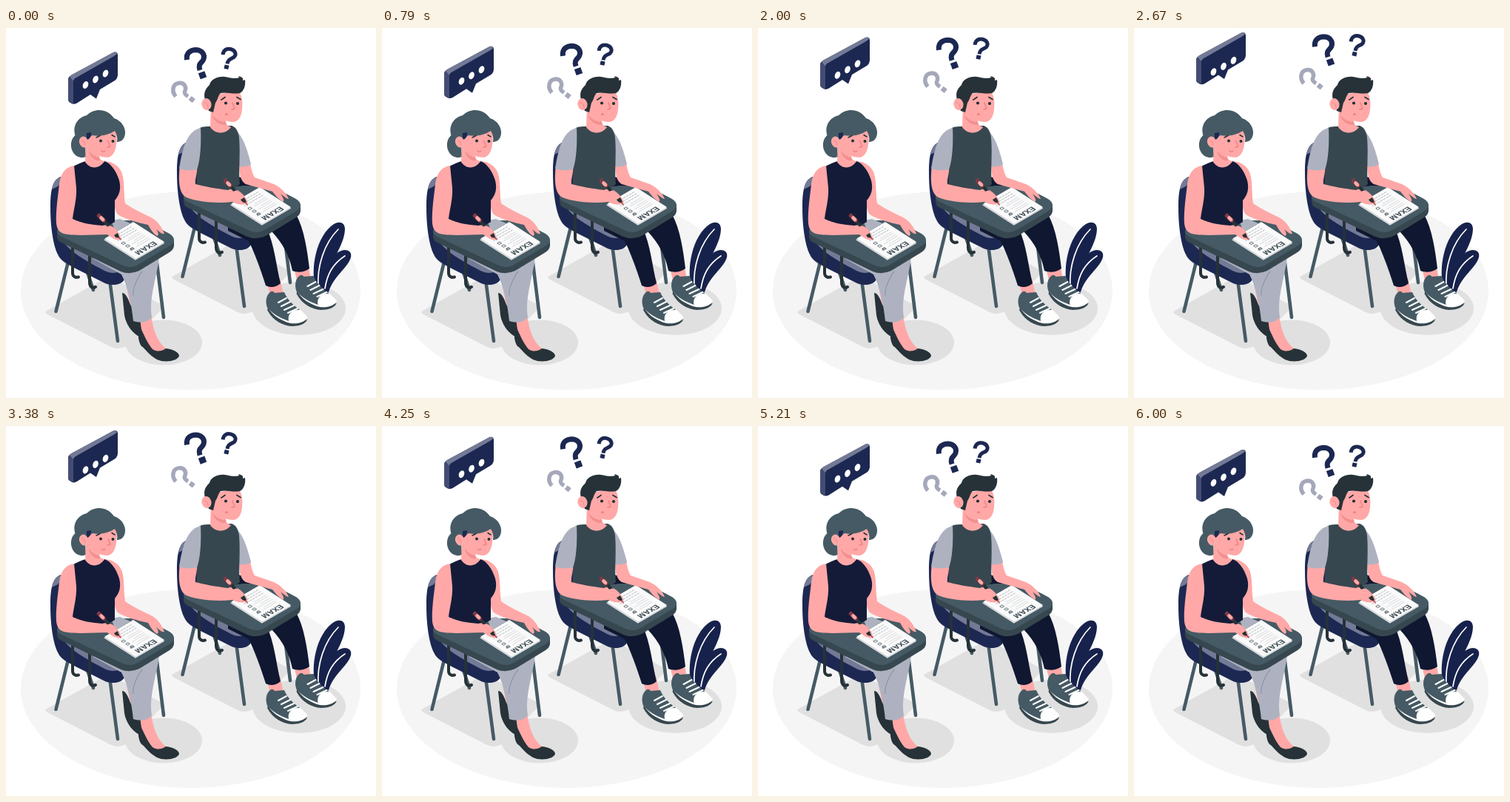
Animation of 500 by 500 pixels, one loop 6.04 s. Source, as an HTML page:

```html
<!DOCTYPE html>
<html lang="en">
<head>
<meta charset="utf-8">
<title>Exam</title>
<style>
  html, body { margin: 0; width: 100%; height: 100%; overflow: hidden; background: #fff; }
  svg { display: block; width: 100vw; height: 100vh; }
  .line { fill: none; stroke-linecap: round; stroke-linejoin: round; }
  .navy { fill: #1c2852; }
  .ink { fill: #141b38; }
  .denim { fill: #0f1731; }
  .mist { fill: #737a96; }
  .lilac { fill: #aeb2c0; }
  .skin { fill: #ffa8a7; }
  .blush { fill: #f28f8f; }
  .teal { fill: #455a64; }
  .slate { fill: #37474f; }
  .coal { fill: #263238; }
  .white { fill: #fff; }
  .exam { font: bold 10.5px "Liberation Sans", Arial, sans-serif; fill: #37474f; }
</style>
</head>
<body>
<svg viewBox="0 0 500 500" xmlns="http://www.w3.org/2000/svg">
  <defs>
    <g id="chair">
      <g class="line" stroke="#455a64" stroke-width="4.6">
        <path d="M84 316L67.500 383M140 340L151 423M203 310L213 391M110 330L118 354"/>
      </g>
      <path class="navy" d="M74 201C63 205 60 219 60 242C60 270 64 294 70 306C74 315 83 319 94 325L134 345C145 349 156 347 160 340L160 318L98 278L92 200Z"/>
      <path class="mist" d="M75 201C67 203 63 210 62 218L70 214L78 204Z"/>
      <path class="mist" d="M74 282C80 300 112 317 133 328C143 333 153 331 157 326L153 312L94 280Z"/>
    </g>
    <g id="desk">
      <g class="line" stroke="#263238" stroke-width="4">
        <path d="M90 292V331Q90 336 95 337L98 336.500M113 302V344Q113 350 118 351L121 350"/>
      </g>
      <path class="slate" d="M69 274V282Q69 287 75 290L155 329Q167 334 180 328L221 303Q227 299 227 294V286L150 270Z"/>
      <path class="teal" d="M70 272C72 267 80 266 90 267L150 260L173 260C190 262 206 270 221 278C229 283 229 290 222 294L180 319C172 324 164 324 156 320L75 282C69 279 68 275 70 272Z"/>
      <g transform="matrix(-.86 .5 -.84 -.54 214 289)">
        <rect x="1.500" y="-2" width="46" height="51" fill="#d5d7db"/>
        <rect width="45" height="50" fill="#fafafa"/>
        <text class="exam" x="8" y="9.500">EXAM</text>
        <g class="line" stroke="#cdd0d5" stroke-width=".7">
          <path d="M8 15H29M8 18H25M8 22H29M8 25H23M8 29H29M8 32H26"/>
        </g>
        <g class="line" stroke="#9ca1aa" stroke-width=".7" stroke-dasharray="2.500 2">
          <path d="M8 37H37M8 41H34M8 45H37"/>
        </g>
        <g class="line" stroke="#37474f" stroke-width=".7">
          <path d="M34 14h3.200v3.200h-3.200zM34 21h3.200v3.200h-3.200zM34 28h3.200v3.200h-3.200zM34.500 15l1.600 1.600l2.500-2.500"/>
        </g>
      </g>
    </g>
    <g id="pencil" class="line" stroke-linecap="butt" stroke-width="4.600">
      <path d="M129 257L148 277" stroke="#263238"/>
      <path d="M125.500 253.500L132 260" stroke="#7b3b45" stroke-width="5.500"/>
      <path d="M128.500 256.500L131 259" stroke="#ffa8a7"/>
      <path d="M147 276L155 286" stroke="#b14f5c" stroke-width="1.600"/>
    </g>
    <g id="sneaker">
      <path class="white" d="M353 380C361 394 374 402 386 403C400 403 408 398 407 390L398 381L362 378Z"/>
      <path class="slate" d="M353 381C361 396 374 402 386 403C399 403 407 398 407 393C399 400 387 401 378 397C366 392 359 386 354 378Z"/>
      <path class="teal" d="M353 362C357 355 360 354 363 358L376 357C380 367 388 374 397 381C387 380 380 386 382 396C370 392 359 385 353 378C351 372 351 367 353 362Z"/>
      <path class="line" stroke="#fff" stroke-width="2" d="M368 371L379 365M372 376L384 370M376 381L389 375M381 385L394 379"/>
    </g>
  </defs>

  <ellipse cx="249.500" cy="355" rx="229.500" ry="134" fill="#f5f5f5"/>
  <g fill="#e0e0e0">
    <path id="shade" d="M55 382L132 339Q140 336 148 340L214 376L164 429Q152 436 142 431L56 387Q51 384 55 382Z"/>
    <use href="#shade" x="171" y="-47"/>
    <ellipse cx="213" cy="425" rx="52" ry="30.500"/>
    <ellipse cx="396" cy="379" rx="63" ry="36"/>
  </g>

  <g id="plant">
    <g fill="#17224c">
      <path d="M420 355C411 334 416 288 439 268C448 260 458 261 458 272C457 296 437 312 431 355Z"/>
      <path d="M429 357C430 328 438 306 453 301C462 298 468 303 466 310C461 326 443 334 436 357Z"/>
    </g>
    <path class="line" stroke="#fff" stroke-width="1.700" d="M422 350C420 322 430 291 449 272M431 352C434 333 441 319 458 308"/>
  </g>

  <g id="boy">
    <use href="#chair" x="171" y="-47"/>
    <path class="skin" d="M388 320L408 318L412 340L394 345ZM352 340L370 338L375 360L358 366Z"/>
    <path class="denim" d="M357 268L392 252C403 272 407 300 410 325C404 330 394 331 387 328C383 308 374 291 360 276Z"/>
    <path class="denim" d="M300 260L352 270C363 293 365 321 371 345C365 351 356 351 351 348C344 326 336 304 328 288L300 274Z"/>
    <path class="denim" d="M296 200L334 203L352 218L312 224Z"/>
    <use href="#sneaker" x="39.500" y="-22"/>
    <use href="#sneaker"/>
    <use href="#desk" x="171" y="-47"/>

    <path class="skin" d="M315 180L330 181C331 190 333 197 336 202L362 211C372 216 379 223 382 231C379 231 374 226 371 224C374 229 377 233 374 235C368 231 364 226 360 221L324 211C317 207 315 198 315 180Z"/>
    <path class="lilac" d="M301 133C317 138 324 156 331 184C327 187 321 188 315 187L304 160Z"/>
    <path class="slate" d="M262 135C266 133 272 133 277 133L305 132C311 134 314 140 315 148C317 172 314 192 316 211C302 224 274 224 257 217C259 195 258 155 258 140Z"/>
    <path class="skin" d="M277 106L276 134C283 144 297 144 304 134C299 132 297 130 297 123Z"/>
    <path class="blush" d="M278 117C284 124 290 127 297 127L297 131C288 131 282 127 278 117Z"/>
    <path class="skin" d="M275 92L314 84C319 91 320 99 319 110C318 120 314 127 306 127C295 126 284 121 279 113Z"/>
    <path class="coal" d="M269 97C266 86 271 81 275 77C277 69 286 65 296 66C302 67 309 69 315 67L314 65C319 66 321 68 320 71L323 70C324 77 322 85 316 88C307 90 298 86 290 88C286 92 286 98 283 101L280 114L274 112C272 107 274 98 272 96Z"/>
    <ellipse class="skin" cx="271" cy="103" rx="6.500" ry="8" transform="rotate(-15 271 103)"/>
    <path class="line" stroke="#f28f8f" stroke-width="1.200" d="M268 101Q272 101 273 107"/>
    <g class="coal"><circle cx="297" cy="101.500" r="2.100"/><circle cx="313" cy="102" r="2.100"/></g>
    <path class="line" stroke="#263238" stroke-width="1.700" d="M291 97L296 93.500M312 93.500L317 96.500"/>
    <path class="line" stroke="#f07f80" stroke-width="1.400" d="M306 101L309 109L305 110"/>
    <ellipse cx="298" cy="116.500" rx="2" ry="1.500" fill="#f07f80"/>
    <path class="skin" d="M235 186L258 188C259 196 255 204 256 211C267 214 284 217 300 219C308 215 316 220 322 227L327 236C321 240 313 239 306 235C286 237 262 236 244 229C235 225 232 210 235 186Z"/>
    <path class="lilac" d="M263 135C246 139 239 158 234 190C241 193 251 193 258 191C263 178 264 152 263 135Z"/>
    <use href="#pencil" x="171" y="-47"/>
    <path class="skin" d="M305 223Q311 216 317 223L326 232Q325 237 317 233L307 232Z"/>
    <path class="coal" d="M317 232L322 229L325 235Q321 238 317 232Z"/>
  </g>

  <g id="girl">
    <use href="#chair"/>
    <path class="skin" d="M163 350L176 352L182 392L171 390Z"/>
    <path class="coal" d="M157 358C161 357 166 367 168 374C173 381 184 391 184 402C184 411 182 417 178 416C169 410 162 400 160 388Z"/>
    <path class="skin" d="M181 390L196 386C198 406 204 424 216 433C209 442 196 438 190 425C183 415 182 402 181 390Z"/>
    <path class="coal" d="M180 404C184 406 188 422 198 434C204 438 211 437 216 433C225 434 234 438 234 443C232 450 215 453 204 448C193 442 187 432 183 430C178 423 178 411 180 404Z"/>
    <path class="lilac" d="M118 300L160 315L207 311C203 339 193 365 197 391C192 398 182 399 172 396C170 376 165 350 156 333L118 312Z"/>
    <path class="line" stroke="#8d91a7" stroke-width="1.200" d="M184 329C177 339 171 350 172 361"/>
    <use href="#desk"/>

    <path class="lilac" d="M142 260L154 258L168 264L148 276Z"/>
    <path class="skin" d="M132 180C146 180 156 189 158 201C160 212 159 225 161 237C174 246 188 252 198 257C206 262 211 270 214 278C210 279 206 274 203 272C206 276 207 280 204 281C198 277 195 271 192 266C178 263 160 258 151 252C145 245 146 229 145 212Z"/>
    <path class="ink" d="M91 187C97 184 103 181 108 180C115 189 127 187 133 180C141 182 149 193 153 206C156 218 153 226 147 233L147 262C130 274 99 267 88 256C93 238 95 219 91 187Z"/>
    <path class="teal" d="M106 143C94 140 87 149 88 160C89 171 99 178 108 174Z"/>
    <path class="skin" d="M108 156L107 181C114 192 127 190 133 180C128 179 126 177 126 171Z"/>
    <path class="blush" d="M112 166C117 172 121 174 126 175L127 179C121 180 114 175 112 166Z"/>
    <path class="skin" d="M109 138L146 130C149 136 151 147 149 157C148 168 143 175 136 175C126 174 115 170 111 162Z"/>
    <path class="teal" d="M95 149C88 134 96 121 109 118C119 108 137 108 146 122C157 125 164 138 160 147C158 152 154 154 150 154C151 149 150 144 147 139C138 145 126 147 117 145C113 147 112 151 108 153Z"/>
    <path class="navy" d="M109 142L115 141C115 147 113 150 109 151Z"/>
    <ellipse class="skin" cx="105" cy="154" rx="6" ry="7.500" transform="rotate(-15 105 154)"/>
    <path class="line" stroke="#f28f8f" stroke-width="1.200" d="M102 152Q106 152 107 158"/>
    <g class="coal"><circle cx="128" cy="152.500" r="2"/><circle cx="144.500" cy="153" r="2"/></g>
    <path class="line" stroke="#263238" stroke-width="1.500" d="M122 148L127 145.500M143 144.500L147 147"/>
    <path class="line" stroke="#f07f80" stroke-width="1.400" d="M138 153L141 160L137 161M129 166Q131 168 134 166.500"/>
    <path class="skin" d="M92 186C80 188 74 196 72 211C70 229 67 248 68 264C69 274 74 278 84 279C100 281 119 279 137 279C145 285 150 288 156 285L151 275C145 267 137 265 130 267C117 266 102 264 90 258C91 247 96 231 95 216Z"/>
    <use href="#pencil"/>
    <path class="skin" d="M135 270Q141 264 146 271L154 280Q153 285 146 281L136 279Z"/>
    <path class="coal" d="M146 280L151 277L153 283Q149 285 146 280Z"/>
  </g>

  <g id="bubble">
    <path class="navy" d="M84 70Q84 66 88 64L145 33Q151 31 151 37V63Q151 68 147 71L127 83L122 95.500L114 90L95 102Q90 104 87 101Q84 100 84 96Z"/>
    <path class="mist" d="M86 66Q87 64 89 63L145 33Q149 31 150 35L146 38L95 67Q91 69 91 72Z"/>
    <path d="M84 70Q84 67 86 66L91 72V102Q84 101 84 96Z" fill="#434d73"/>
  </g>
  <g id="dots" class="white">
    <ellipse cx="107.500" cy="77" rx="3.600" ry="5.200" transform="rotate(22 107.500 77)"/>
    <ellipse cx="121" cy="69.500" rx="3.600" ry="5.200" transform="rotate(22 121 69.500)"/>
    <ellipse cx="134.500" cy="61.500" rx="3.600" ry="5.200" transform="rotate(22 134.500 61.500)"/>
  </g>

  <g id="questions" fill="none" stroke-linejoin="round">
    <g stroke="#1c2852">
      <path stroke-width="7" d="M244.500 43C243 33 250 29.500 257 29.500C265 30 269 36 267 42C265 48 259 47 262 57"/>
      <path stroke-width="5" d="M293 36C294 29 299 27.500 303.500 28.500C310 30 312 36 308 39.500C304 42 300 42 299 48.500"/>
    </g>
    <path stroke="#a5a8ba" stroke-width="5.500" d="M229.500 92.500C223.500 86 225 76 233 74.500C241 73 244 80 242 84.500C240 88 242 90 246 92.500"/>
    <rect class="navy" x="261" y="59.500" width="9" height="8.500" transform="rotate(-20 265.500 63.700)"/>
    <rect class="navy" x="295" y="50" width="6" height="5.500" transform="rotate(13 298 52.700)"/>
    <rect x="248" y="93.300" width="6.500" height="6.500" fill="#a5a8ba" transform="rotate(38 251.200 96.500)"/>
  </g>
</svg>
<script>
  const LOOP = 6040;
  const floaters = [["bubble", 30], ["dots", 20], ["questions", 20]].map(
    ([id, rise]) => ({ node: document.getElementById(id), rise }));
  const start = performance.now();

  // Each floater rises steadily for half the loop, then sinks back.
  function draw(time) {
    const phase = (time % LOOP) / LOOP;
    const lift = 1 - Math.abs(1 - 2 * phase);
    for (const { node, rise } of floaters)
      node.setAttribute("transform", `translate(0 ${(-rise * lift).toFixed(3)})`);
  }

  function tick(now) {
    draw(Math.max(0, now - start));
    requestAnimationFrame(tick);
  }
  draw(0);
  requestAnimationFrame(tick);
</script>
</body>
</html>
```
